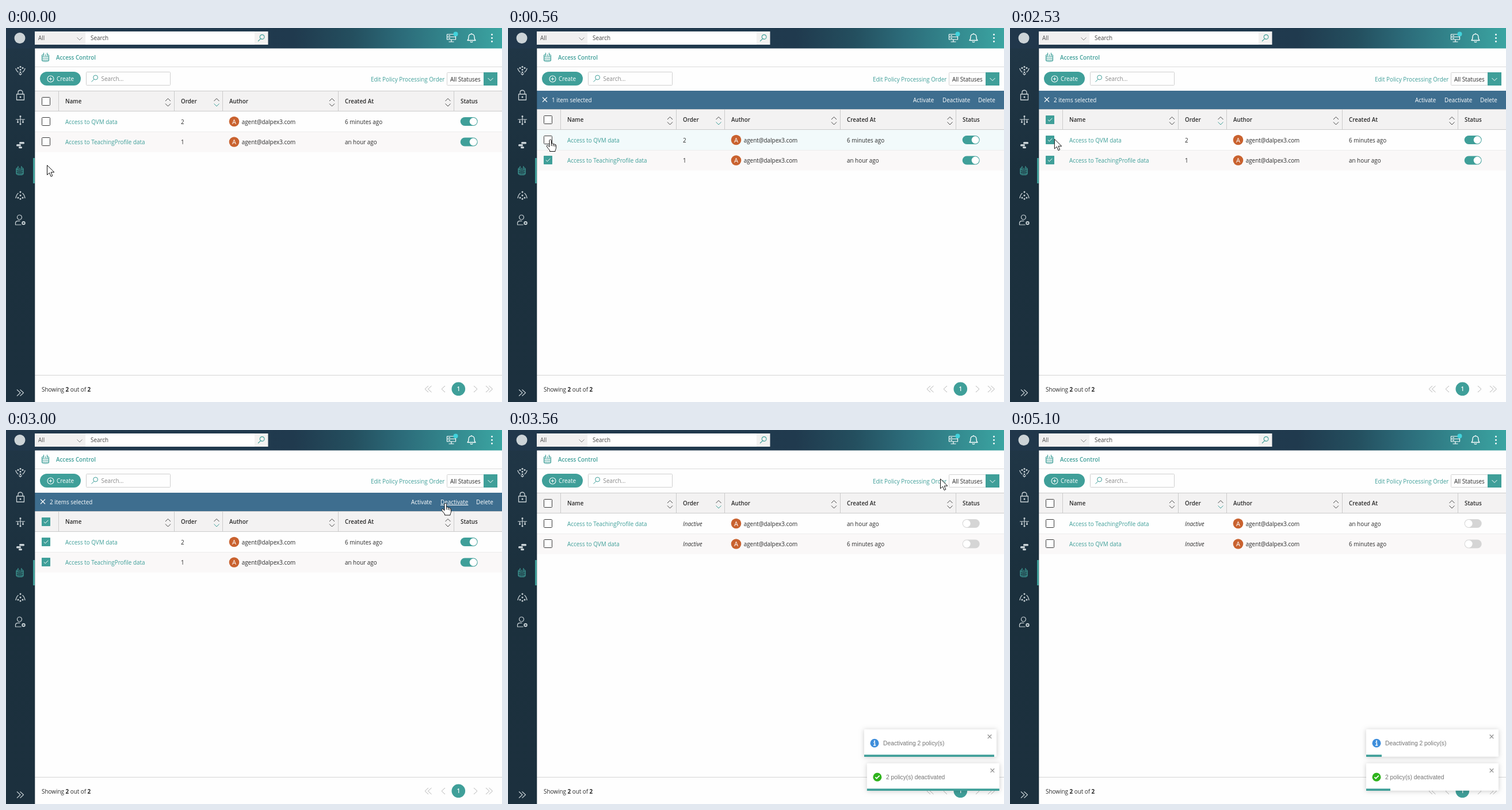
Animation, 862 px wide and 650 px high, one loop 5.13 s. Source, as an HTML page with a canvas:

```html
<!DOCTYPE html>
<html lang="en">
<head>
<meta charset="utf-8">
<title>Access Control</title>
<style>
html, body { margin: 0; width: 100%; height: 100%; overflow: hidden; background: #fefefe; }
canvas { display: block; }
</style>
</head>
<body>
<canvas id="stage" width="862" height="650"></canvas>
<script>
const ctx = document.getElementById('stage').getContext('2d');
const LOOP = 5130, W = 862, H = 650;
const TEAL = '#3f9f99', INK = '#2b2b2b', PAGE = '#fefefe', ICON = '#c9d2d6', LINE = '#cbcbcb';
const UI = '"Open Sans", "Noto Sans", sans-serif';
const ARIAL = '"Liberation Sans", Arial, sans-serif';

const POLICIES = [
  { name: 'Access to QVM data', order: '2', age: '6 minutes ago' },
  { name: 'Access to TeachingProfile data', order: '1', age: 'an hour ago' }
];
const AUTHOR = 'agent@dalpex3.com';

// ---- timing helpers
const clamp = v => Math.max(0, Math.min(1, v));
const ramp = (t, a, b) => clamp((t - a) / (b - a));
const smooth = p => p * p * (3 - 2 * p);
const mix = (a, b, p) => a + (b - a) * p;
function keys(t, list) {
  if (t <= list[0][0]) return list[0][1];
  for (let i = 1; i < list.length; i++) {
    const [t0, v0] = list[i - 1], [t1, v1] = list[i];
    if (t <= t1) return mix(v0, v1, (t - t0) / (t1 - t0));
  }
  return list[list.length - 1][1];
}

// ---- drawing helpers
function box(x, y, w, h, color) {
  ctx.fillStyle = color;
  ctx.fillRect(x, y, w, h);
}
function round(x, y, w, h, r, fill, stroke) {
  ctx.beginPath();
  ctx.roundRect(x, y, w, h, r);
  if (fill) { ctx.fillStyle = fill; ctx.fill(); }
  if (stroke) { ctx.strokeStyle = stroke; ctx.lineWidth = 1; ctx.stroke(); }
}
function dot(x, y, r, color) {
  ctx.beginPath();
  ctx.arc(x, y, r, 0, 7);
  ctx.fillStyle = color;
  ctx.fill();
}
function icon(d, x, y, color, width = 1, fill) {
  const path = new Path2D(d);
  ctx.save();
  ctx.translate(x, y);
  if (fill) { ctx.fillStyle = fill; ctx.fill(path); }
  ctx.strokeStyle = color;
  ctx.lineWidth = width;
  ctx.lineJoin = 'round';
  ctx.stroke(path);
  ctx.restore();
}
function text(s, x, y, color = INK, { size = 9.9, font = UI, style = '', align = 'left' } = {}) {
  ctx.font = `${style} ${size}px ${font}`;
  ctx.textAlign = align;
  ctx.fillStyle = color;
  ctx.fillText(s, x, y);
  return ctx.measureText(s).width;
}
const bold = { style: '600', size: 9.8 };

const CHEVRON = {
  up: 'M-4.5 2L0 -2.5L4.5 2', down: 'M-4.5 -2L0 2.5L4.5 -2',
  left: 'M3 -5.5L-3 0L3 5.5', right: 'M-3 -5.5L3 0L-3 5.5'
};
const LENS = 'M-1.2 1.4L-5.5 5.5M5.5 -2A3.9 3.9 0 1 1 -2.3 -2A3.9 3.9 0 1 1 5.5 -2';
const CROSS = 'M-4 -4L4 4M4 -4L-4 4';
const TICK = 'M-3.6 0L-1.2 2.4L3.8 -2.6';
const STACK = 'M-6 -2C-6 1 6 1 6 -2V6C6 9 -6 9 -6 6ZM-6 1C-6 4 6 4 6 1M-6 4C-6 7 6 7 6 4' +
  'M-6 -2C-6 -4 -4 -4 -3 -4M6 -2C6 -4 4 -4 3 -4M-3 -1V-7M3 -1V-7M0 -1V-4';

function sidebar() {
  const g = ctx.createLinearGradient(0, 35, 0, H);
  g.addColorStop(0, '#203646');
  g.addColorStop(0.35, '#1b303d');
  g.addColorStop(1, '#1c303e');
  ctx.fillStyle = g;
  ctx.fillRect(0, 35, 50.3, H - 35);

  icon('M-8 -3C-7.5 0 -6 2.5 -3.5 4M8 -3C7.5 0 6 2.5 3.5 4M-2.5 6L0 8.5L2.5 6', 25, 73, ICON, 1.4);
  for (const [x, y] of [[0, -5.5], [-4, -3.5], [4, -3.5], [0, -0.5], [0, 4]]) dot(25 + x, 73 + y, 1.5, ICON);

  icon('M-6.5 -2H6.5V8H-6.5ZM-4 -2V-5C-4 -10 4 -10 4 -5V-2', 25, 117, ICON, 1.3);
  dot(25, 120, 1.5, ICON);

  icon('M0 -6V7M-8 -1H8M-4.5 -1V3M4.5 -1V3', 25, 160, ICON, 1.2);
  for (const [x, y] of [[0, -6.5], [-4.5, 3.5], [4.5, 3.5], [0, 7]]) dot(25 + x, 160 + y, 1.5, ICON);

  round(23, 198, 9, 3.6, 1.5, ICON);
  round(18, 202, 8, 3.6, 1.5, ICON);
  round(22, 206, 6, 3.2, 1.5, ICON);

  icon(STACK, 24, 247, TEAL, 1.2);
  box(47, 226, 3, 44, TEAL);

  icon('M-8 5C-7.5 1 -6 -2 -3.5 -4M8 5C7.5 1 6 -2 3.5 -4', 25, 291, ICON, 1.3);
  for (const [x, y] of [[0, -6], [0, 0], [-4, 4], [4, 4], [0, 6]]) dot(25 + x, 291 + y, 1.5, ICON);

  icon('M4 -5A4 4 0 1 1 -4 -5A4 4 0 1 1 4 -5M3 8H-7V5C-7 1 -3 1 1 1.5', 23.5, 334, ICON, 1.2);
  dot(30.5, 339, 3.2, ICON);
  dot(30.5, 339, 1.3, '#1c303e');

  icon(CHEVRON.right, 22, 634, ICON, 1.1);
  icon(CHEVRON.right, 27.5, 634, ICON, 1.1);
}

function topbar() {
  const g = ctx.createLinearGradient(0, 0, W, 0);
  g.addColorStop(0, '#21374b');
  g.addColorStop(0.58, '#203a4e');
  g.addColorStop(0.7, '#244f5f');
  g.addColorStop(0.8, '#2c6c7a');
  g.addColorStop(1, '#3ba5a2');
  ctx.fillStyle = g;
  ctx.fillRect(0, 0, W, 35.5);
  dot(24, 17.5, 9.5, '#ccd3d7');

  box(50, 6, 88, 23, '#f1f0f0');
  box(138, 6, 294, 23, PAGE);
  box(432, 6, 23.5, 23, '#f3f2f1');
  text('All', 56, 21, '#555');
  text('Search', 147, 21, '#444');
  icon(CHEVRON.down, 128, 18.5, '#777', 0.9);
  icon(LENS, 443.5, 17.5, TEAL, 1.1);

  icon('M-7.5 -6H7.5V-1.5H-7.5ZM-7.5 -1.5H7.5V3H-7.5ZM0 3V7M-4.5 7H4.5M-5 -3.7H-2M-5 .8H-2', 774, 17, '#fff', 1.2);
  dot(781.5, 10.5, 4, '#41d3dc');
  icon('M-7 4.5C-5 3 -5 1 -5 -1.5C-5 -8 5 -8 5 -1.5C5 1 5 3 7 4.5ZM-2 6.5C-1.5 8 1.5 8 2 6.5M0 -6.5V-8', 809, 17, '#fff', 1.3);
  for (const y of [11.5, 17.5, 23.5]) dot(844.5, y, 1.4, '#fff');
}

function toolbar(shift) {
  icon(STACK, 68.5, 50, TEAL, 1.1);
  text('Access Control', 87, 54.5, TEAL, bold);
  box(50, 67, W - 50, 1, '#dcdcdc');

  round(59, 76, 71, 24, 12, TEAL);
  icon('M5.5 0A5.5 5.5 0 1 1 -5.5 0A5.5 5.5 0 1 1 5.5 0M-2.8 0H2.8M0 -2.8V2.8', 77.5, 88.5, '#fff', 1.1);
  text('Create', 88, 92, '#fff');

  round(139.5, 76.5, 146, 23, 1, PAGE, '#cfcfcf');
  icon(LENS, 154, 88, TEAL, 1);
  text('Search...', 165.5, 92, '#8a8a8a');

  ctx.save();
  ctx.translate(shift, 0);
  text('Edit Policy Processing Order', 634, 93, TEAL);
  round(766.5, 77.5, 64, 22, 1, PAGE, '#d3d3d3');
  text('All Statuses', 772, 92.5);
  box(830, 77, 24, 23, TEAL);
  icon(CHEVRON.down, 842, 89, '#fff', 1);
  ctx.restore();
}

function actionBar(t, h, shift) {
  if (h <= 0) return;
  const closing = t > 3200;
  const pad = closing ? 12 * (1 - h / 32) : 0;
  const mid = 109 + h / 2;
  ctx.save();
  ctx.beginPath();
  ctx.rect(50, 109, W - 50 + shift, Math.round(h));
  ctx.clip();
  box(50, 109, W - 50, 32, '#3e6e8f');
  icon(CROSS, 64 - pad, mid - 0.5, '#fff', 1.1);
  const label = closing ? '0 items selected' : t < 830 ? '1 item selected' : '2 items selected';
  text(label, 76 - pad, mid + 4, '#fff');
  const right = shift + pad;
  text('Activate', 704 + right, mid + 4, '#fff');
  const w = text('Deactivate', 755 + right, mid + 4, '#fff');
  if (t >= 2930 && t < 3230) box(755, mid + 5, w, 1, '#fff');
  text('Delete', 817 + right, mid + 4, '#fff');
  ctx.restore();
}

function checkbox(x, y, on) {
  round(x - 7, y - 7, 14, 14, 1, PAGE, '#3a3a3a');
  if (!on) return;
  ctx.globalAlpha = on;
  round(x - 7.5, y - 7.5, 15, 15, 1, TEAL);
  icon(TICK, x, y, '#fff', 1);
  ctx.globalAlpha = 1;
}

function toggle(x, y, on) {
  round(x - 15, y - 7.5, 30, 15, 7.5, on ? TEAL : '#d5d5d5');
  dot(x + (on ? 7.5 : -7.5), y, 6.5, '#fff');
}

function table(t, h, shift) {
  const top = 109 + Math.round(h);
  const k = (W - 50 + shift) / (W - 50);
  const X = x => 50 + (x - 50) * k;
  const end = W + shift;
  const off = 1 - ramp(t, 3225, 3290);
  const first = ramp(t, 815, 930) * off;
  const second = ramp(t, 300, 370) * off;

  box(50, top, end - 50, 36, '#f3f2f2');
  box(50, top, end - 50, 1, LINE);
  box(50, top + 35, end - 50, 1, LINE);
  for (const x of [91, 292, 376, 577, 778]) box(Math.round(X(x)), top, 1, 36, LINE);
  checkbox(Math.floor(X(69.5)) + 0.5, top + 18.5, first);
  const heads = [['Name', 103], ['Order', 304], ['Author', 388], ['Created At', 589], ['Status', 790]];
  for (const [s, x] of heads) text(s, X(x), top + 22, INK, bold);
  for (const x of [281.5, 366, 566.5, 768]) {
    icon(CHEVRON.up, X(x), top + 16, '#444', 1);
    icon(CHEVRON.down, X(x), top + 24.5, x === 366 ? TEAL : '#444', 1);
  }

  const inactive = t >= 3390;
  const rows = inactive ? [POLICIES[1], POLICIES[0]] : POLICIES;
  const tip = cursorAt(t).y;
  rows.forEach((row, i) => {
    const y = top + 36 + i * 35.5, mid = y + 17.5;
    const hover = t < 1260 && tip >= y && tip < y + 35;
    box(50, y, end - 50, 35, hover ? '#f2fafb' : i ? '#faf8f8' : PAGE);
    if (!i) box(50, top + 71, end - 50, 1, '#e2e2e2');
    checkbox(Math.floor(X(69.5)) + 0.5, Math.round(mid) - 0.5, i ? second : first);
    text(row.name, X(103), mid + 4, TEAL);
    text(inactive ? 'Inactive' : row.order, X(304), mid + 4, INK, inactive ? { style: 'italic' } : {});
    dot(X(396.5), mid, 8.8, '#c9622f');
    text('A', X(396.5), mid + 4, '#fff', { size: 11, align: 'center' });
    text(AUTHOR, X(409.7), mid + 4);
    text(row.age, X(589), mid + 4);
    toggle(X(804.7), mid, !inactive);
  });
}

function footer(shift, drop) {
  ctx.save();
  ctx.translate(0, drop);
  box(50, 603, W - 50 + shift, 1, '#d4d4d4');
  let x = 62;
  for (const [s, style] of [['Showing ', ''], ['2', '700'], [' out of ', ''], ['2', '700']]) {
    x += text(s, x, 632, INK, { style });
  }
  ctx.translate(shift, 0);
  const grey = '#b5b5b5';
  for (const x of [731, 736.5, 760]) icon(CHEVRON.left, x, 627.5, grey, 1);
  for (const x of [816, 837, 842.5]) icon(CHEVRON.right, x, 627.5, grey, 1);
  dot(786.3, 627.3, 11.8, TEAL);
  text('1', 786.3, 631, '#fff', { style: '600', align: 'center' });
  ctx.restore();
}

function scrollbar() {
  box(851, 35, 11, H - 35, '#f1f1f1');
  box(852, 48, 9, 586, '#c1c1c1');
  icon('M-2.5 1.5L0 -1.5L2.5 1.5Z', 856.5, 42, '#606060', 0.5, '#606060');
  icon('M-2.5 -1.5L0 1.5L2.5 -1.5Z', 856.5, 644, '#606060', 0.5, '#606060');
}

function toast(t, start, y, label, left, done) {
  const p = (t - start) / 250;
  if (p < 0) return;
  const dx = keys(p, [[0, 2200], [0.6, -18], [0.75, 7.4], [0.9, -3.7], [1, 0]]);
  ctx.save();
  ctx.globalAlpha = clamp(p / 0.6);
  ctx.translate(619 + dx, y);
  ctx.shadowColor = 'rgba(0,0,0,.2)';
  ctx.shadowBlur = 8;
  ctx.shadowOffsetY = 1;
  round(0, 0, 230, 47.5, 1, '#fff');
  ctx.shadowColor = 'transparent';
  dot(18, 24, 7.5, done ? '#2fb31d' : '#3e8edb');
  if (done) icon(TICK, 18, 24, '#fff', 1.8);
  else {
    dot(18, 20.5, 1.2, '#fff');
    icon('M-1.8 -1H.4V3.8M-2 3.8H2.2', 18, 24, '#fff', 1.5);
  }
  text(label, 33, 28, '#757575', { size: 10.3, font: ARIAL });
  icon('M-3.3 -3.3L3.3 3.3M3.3 -3.3L-3.3 3.3', 218, 12.5, '#8c8c8c', 1.2);
  box(0, 44, 230 * left, 3.7, TEAL);
  ctx.restore();
}

function toasts(t) {
  const next = 3365;
  toast(t, 3310, t < next ? 579.3 : 520.3, 'Deactivating 2 policy(s)',
    keys(t, [[3530, 1], [3560, 0.983], [4800, 0.296], [5130, 0.1]]), false);
  toast(t, next, 579.3, '2 policy(s) deactivated',
    keys(t, [[3710, 1], [5100, 0.183], [5130, 0.165]]), true);
}

function cursorAt(t) {
  const moves = [[60, 260, 73, 193], [2510, 2990, 763, 126.5], [3340, 3560, 751, 84.5], [3560, 3760, 748, 69]];
  let x = 71, y = 238;
  for (const [a, b, tx, ty] of moves) {
    const p = smooth(ramp(t, a, b));
    x = mix(x, tx, p);
    y = mix(y, ty, p);
  }
  return { x, y };
}

function cursor(t) {
  if (t >= 3900) return;
  const { x, y } = cursorAt(t);
  const hand = (t >= 210 && t < 1260) || (t >= 2930 && t < 3360);
  const shape = hand
    ? 'M-1.5 13V2C-1.5 0 2 0 2 2V7.5C3 6.6 5 7 5 8.3C6 7.5 7.6 8 7.8 9.2C8.8 8.6 10 9.2 10 10.5V15C10 17 8.5 18 8.5 21H-1V19C-3 17 -4.5 15 -6 12.5C-7 10.5 -5 9.5 -3.8 10.8Z' +
      'M5 8.3V12M7.8 9.2V12.5M2 7.5V11.5'
    : 'M0 0V16.8L4 13.2L6.6 19.6L9.3 18.4L6.7 12.2H12.4Z';
  icon(shape, x + 0.5, y + 0.5, '#111', 1, '#fff');
}

function draw(t) {
  const open = smooth(ramp(t, 320, 560)), close = smooth(ramp(t, 3225, 3333));
  const h = 32 * open * (1 - close);
  const squeezed = t >= 3250 && t < 3335;
  const shift = squeezed ? -12.3 : 0;
  box(0, 0, W, H, PAGE);
  toolbar(shift);
  table(t, h, shift);
  actionBar(t, h, shift);
  footer(shift, squeezed ? 5 : 0);
  if (squeezed) scrollbar();
  sidebar();
  topbar();
  toasts(t);
  cursor(t);
}

const begin = performance.now();
function frame() {
  draw((performance.now() - begin) % LOOP);
  requestAnimationFrame(frame);
}
frame();
</script>
</body>
</html>
```
